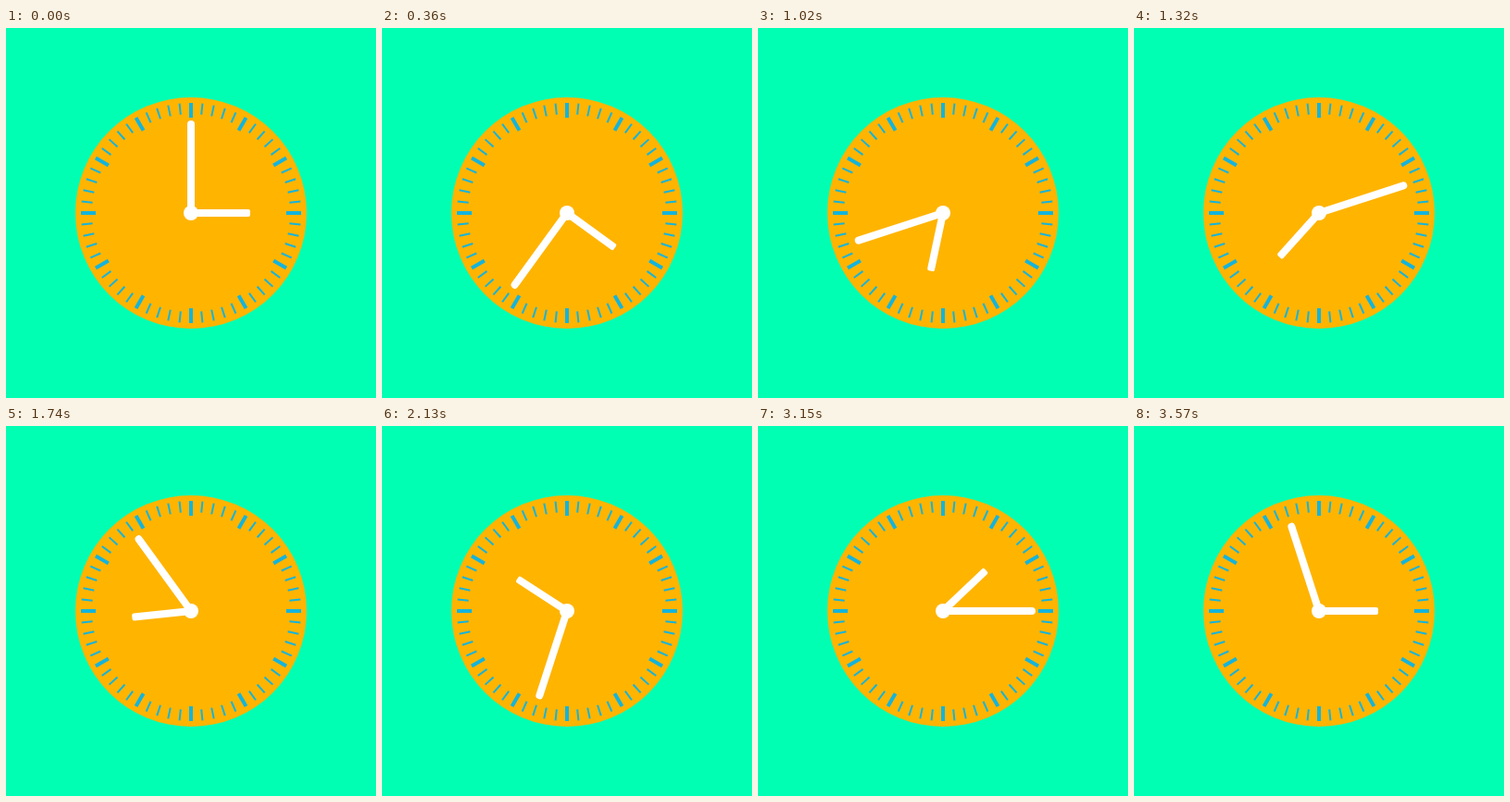
Write an HTML page that moves like this. It is 400 px wide and 400 px high and loops after 3600 ms.

```html
<!DOCTYPE html>
<html lang="en">
<head>
<meta charset="utf-8">
<title>Clock</title>
<style>
  html, body { margin: 0; width: 100%; height: 100%; overflow: hidden; background: #00ffb3; }
  svg { display: block; width: 400px; height: 400px; }
</style>
</head>
<body>
<svg viewBox="-200 -200 400 400">
  <circle r="125" fill="#ffb400"/>
  <g id="ticks" stroke="#14b4dc"></g>
  <g fill="#fff">
    <rect id="hour" x="-4" y="-64" width="8" height="64" rx="2"/>
    <rect id="minute" x="-4" y="-100" width="8" height="104" rx="4"/>
    <circle r="8"/>
  </g>
</svg>
<script>
const LOOP = 3600, STEP = 30;
const $ = id => document.getElementById(id);
const rotate = (id, deg) => $(id).setAttribute('transform', `rotate(${deg})`);

$('ticks').innerHTML = Array.from({ length: 60 }, (_, i) => {
  const major = i % 5 === 0;
  return `<path d="M0-119V${major ? -103 : -107}" stroke-width="${major ? 4 : 2}" transform="rotate(${i * 6})"/>`;
}).join('');

// The last quarter turn ends one step early, so the hand rests briefly at three.
function hourAngle(step) {
  return step < 90 ? 90 + step * 3 : (step - 90) * 90 / 29;
}

function draw() {
  const step = Math.floor(performance.now() % LOOP / STEP);
  rotate('minute', step * 18);
  rotate('hour', hourAngle(step));
  requestAnimationFrame(draw);
}
draw();
</script>
</body>
</html>
```
